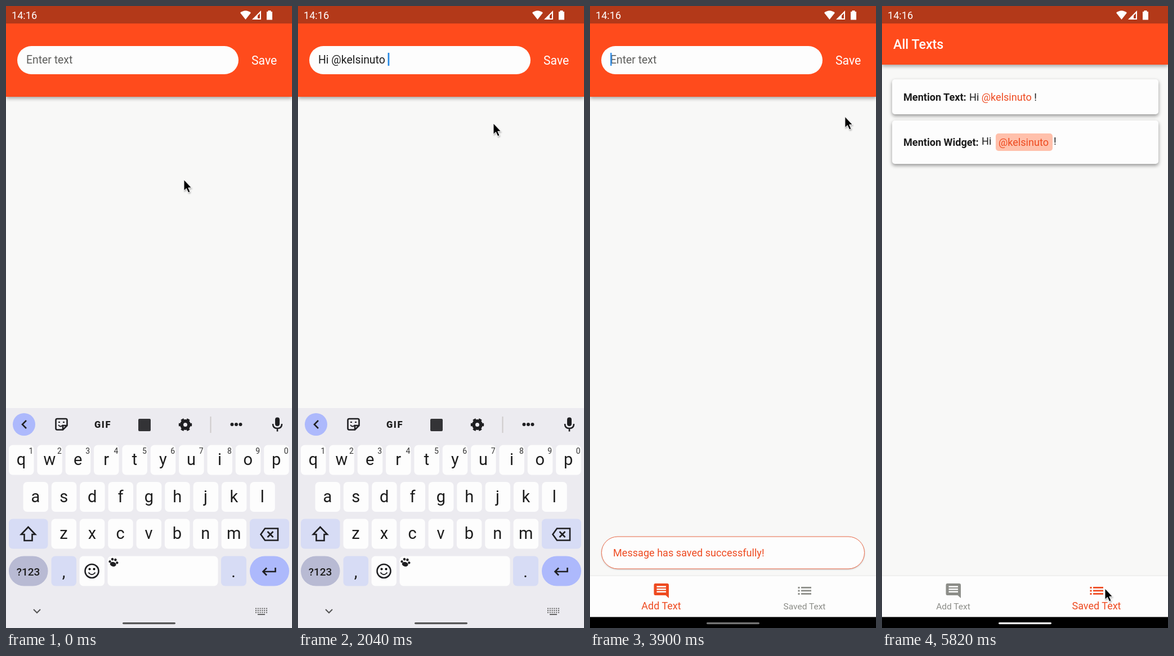
An HTML page for the animation above (5850 ms loop, 508 px wide and 1103 px high).

```html
<!DOCTYPE html>
<html lang="en">
<head>
<meta charset="utf-8">
<title>Mention text</title>
<style>
html, body { margin: 0; width: 100%; height: 100%; overflow: hidden; background: #f8f8f7; }
svg { display: block; width: 508px; height: 1103px; }
text { font: 18.1px Roboto, sans-serif; white-space: pre; fill: #1c1c1c; }
.mid { text-anchor: middle; }
.white { fill: #fff; }
.red { fill: #ee4a20; }
.bold { font-weight: 700; }
.paper { fill: #fdfdfd; }
.bar { fill: #ff4b1c; filter: drop-shadow(0 3px 3px #0005); }
.card { fill: #fdfdfd; filter: drop-shadow(0 3px 3px #0006); }
.line { fill: none; stroke: #1f1f22; stroke-width: 2.6; }
.soft { fill: #d7dcf5; }
.blue { fill: #adb9fc; }
.key { font-size: 29px; }
.digit { font-size: 14px; fill: #333; }
</style>
</head>
<body>
<svg viewBox="0 0 508 1103">
  <g id="addPage">
    <rect class="bar" y="20" width="508" height="141"/>
    <rect class="paper" x="20" y="71" width="393" height="50" rx="25"/>
    <text id="field" x="36" y="101.5" style="font-size:19.4px"></text>
    <rect id="caret" y="83" width="2.7" height="23" fill="#2488e5"/>
    <text class="white" x="436" y="104" style="font-size:21.2px">Save</text>
  </g>

  <g id="listPage">
    <rect class="bar" y="20" width="508" height="84"/>
    <text class="white" x="20" y="76" style="font-size:23.2px;font-weight:500">All Texts</text>
    <rect class="card" x="18" y="130" width="473" height="62" rx="5"/>
    <text x="38" y="167.5" class="bold">Mention Text:</text>
    <text x="155" y="167.5">Hi <tspan class="red">@kelsinuto</tspan> !</text>
    <rect class="card" x="18" y="203" width="473" height="77" rx="5"/>
    <text x="38" y="247.5" class="bold">Mention Widget:</text>
    <text x="177" y="245.5">Hi</text>
    <rect x="202" y="226" width="101" height="31" rx="5" fill="#ffc0ab"/>
    <text x="207" y="247.5" class="red">@kelsinuto</text>
    <text x="305" y="245.5">!</text>
  </g>

  <rect width="508" height="31" fill="#b33919"/>
  <text class="white" x="10" y="22.5">14:16</text>
  <g class="white">
    <path d="M416 12Q425.500 4.500 435 12L425.500 24Z"/>
    <path fill-rule="evenodd" d="M437 24 453 8V24ZM447 22H451V13L447 17Z"/>
    <path d="M463 10H465.500V8H470.500V10H473V24.500H463Z"/>
  </g>

  <g id="toast">
    <rect x="20.500" y="941" width="467" height="57" rx="28.500" fill="#fdfdfd" stroke="#ec6a48" style="filter:drop-shadow(0 1px 1px #0003)"/>
    <text class="red" x="41" y="976">Message has saved successfully!</text>
  </g>

  <rect class="paper" y="1011" width="508" height="73" style="filter:drop-shadow(0 -1px 1px #0001)"/>
  <g id="addTab">
    <path fill-rule="evenodd" d="M116 1024H137Q140 1024 140 1027V1050L134.500 1045H116Q113.500 1045 113.500 1042V1027Q113.500 1024 116 1024ZM118.500 1028.500V1031H135V1028.500ZM118.500 1033V1035.500H135V1033ZM118.500 1037.500V1040H135V1037.500Z"/>
    <text class="mid" x="126.500" y="1069.500" style="fill:inherit;font-size:inherit">Add Text</text>
  </g>
  <g id="savedTab">
    <path d="M369.500 1030h3v3h-3zm0 5.500h3v3h-3zm0 5.500h3v3h-3zM375 1030h18v2.700h-18zm0 5.500h18v2.700h-18zm0 5.500h18v2.700h-18z"/>
    <text class="mid" x="381" y="1069.500" style="fill:inherit;font-size:inherit">Saved Text</text>
  </g>
  <rect y="1083.500" width="508" height="20"/>

  <g id="board">
    <rect y="713" width="508" height="390" fill="#ecebf0"/>
    <circle class="blue" cx="32" cy="742" r="20"/>
    <path class="line" d="M36 735 29 742 36 749"/>
    <path class="line" d="M91 732H106Q108.500 732 108.500 734.500V744L101 751.500H91Q88.500 751.500 88.500 749V734.500Q88.500 732 91 732ZM108 744H101V751"/>
    <path class="line" style="stroke-width:2" d="M93 738H96M101 738H104M93 743Q97 748 101 743"/>
    <text class="mid" x="172" y="747.500" style="font-size:16.500px;font-weight:900;letter-spacing:1.600px">GIF</text>
    <rect x="235" y="732" width="22" height="22" rx="2" fill="#333336"/>
    <circle class="line" cx="318.500" cy="742.500" r="6.500" style="stroke-width:6"/>
    <circle class="line" cx="318.500" cy="742.500" r="10" pathLength="12" style="stroke-width:3.500" stroke-dasharray="1" stroke-dashoffset=".5"/>
    <path d="M363.500 728V757" stroke="#cfcbcb" stroke-width="2"/>
    <g fill="#1f1f22"><circle cx="401.500" cy="742" r="3"/><circle cx="409" cy="742" r="3"/><circle cx="416.500" cy="742" r="3"/>
      <rect x="478" y="729.500" width="8" height="15.500" rx="4"/></g>
    <path class="line" d="M474 741Q474 749 482 749T490 741M482 749V754.500"/>
    <g id="keys"></g>
    <path id="shift" class="line" d="M39.500 924 52 937H46.500V948H32.500V937H27Z"/>
    <path class="line" d="M460 926.500H483V947.500H460L452.500 937ZM464.500 932 474.500 942M474.500 932 464.500 942"/>
    <text class="mid" x="39.500" y="1009.500" style="font-size:19px;font-weight:500">?123</text>
    <circle class="line" cx="152.500" cy="1002" r="12"/>
    <circle cx="148.500" cy="998.500" r="2"/><circle cx="156.500" cy="998.500" r="2"/>
    <path class="line" style="stroke-width:2" d="M146.500 1004.500Q152.500 1012 158.500 1004.500"/>
    <g transform="rotate(12 191 986)" fill="#1f1f22">
      <ellipse cx="191" cy="990" rx="5.500" ry="4"/><circle cx="184.500" cy="986.500" r="2.200"/>
      <circle cx="188" cy="981.500" r="2.300"/><circle cx="193.500" cy="981.500" r="2.300"/><circle cx="197.500" cy="986" r="2.200"/>
    </g>
    <path class="line" d="M478.500 996V1003H457M463 996.500 456.500 1003 463 1009.500"/>
    <path class="line" style="stroke:#555;stroke-width:2" d="M49 1070 55 1076 61 1070"/>
    <path d="M443 1068.500H464M443 1072H464M443 1075.500H464" stroke="#666" stroke-width="2" stroke-dasharray="2 1.800"/>
    <path d="M447 1079H460" stroke="#666" stroke-width="2"/>
  </g>
  <rect id="handle" x="207" y="1093" width="94" height="3.200" rx="1.600"/>
  <path id="mouse" d="M0 0V19.500L4.400 15.500 7.800 23 11 21.500 7.800 14.300H13.500Z" stroke="#fff" stroke-width="1" style="filter:drop-shadow(1px 2px 1px #0004)"/>
</svg>
<script>
const LOOP = 5850, MENTION = 'Hi @kelsinuto ';
const $ = id => document.getElementById(id);
const make = (tag, attrs, text = '') => {
  const el = document.createElementNS('http://www.w3.org/2000/svg', tag);
  for (const k in attrs) el.setAttribute(k, attrs[k]);
  el.textContent = text;
  return $('keys').appendChild(el);
};
const cap = (x, y, w, cls = 'paper', rx = 7) =>
  make('rect', { x, y, width: w, height: 53, rx, class: cls });

const letters = [];
[['qwertyuiop', 5, 778.5], ['asdfghjkl', 30.5, 844], ['zxcvbnm', 80.5, 909.5]].forEach(([row, x0, y], r) =>
  [...row].forEach((ch, i) => {
    const x = x0 + i * 50.35;
    cap(x, y, 44.5);
    letters.push({ ch, y, el: make('text', { x: x + 22, class: 'key mid' }) });
    if (!r) make('text', { x: x + 39.5, y: 793.5, class: 'digit mid' }, (i + 1) % 10);
  }));
cap(5, 909.5, 69.5, 'soft');
cap(433, 909.5, 70, 'soft');
cap(5, 975.5, 69.5, '', 26.5).style.fill = '#b8bad3';
cap(80.5, 975.5, 44.5, 'soft');
cap(130.5, 975.5, 44.5);
cap(180.5, 975.5, 196);
cap(382, 975.5, 45, 'soft');
cap(433, 975.5, 70, 'blue', 26.5);
make('text', { x: 102.5, y: 1013, class: 'key mid' }, ',');
make('text', { x: 404, y: 1013, class: 'key mid' }, '.');

const typed = [[0, ''], [420, 'H'], [570, 'Hi'], [960, 'Hi '], [1080, 'Hi @'],
  [1920, MENTION], [2640, MENTION + '!'], [3540, '']];
const shifts = [[300, 510], [870, 1200], [2460, 2700]];
// start, end, x, y, sideways bend
const moves = [[1350, 1800, 347, 208, 0], [2760, 3150, 447, 97, 0], [3800, 4300, 396, 1033, 119]];

const ramp = (t, a, b) => Math.min(1, Math.max(0, (t - a) / (b - a)));
const ease = p => p * p * (3 - 2 * p);
const mix = (a, b, p) => a + (b - a) * p;
const show = (id, on) => $(id).style.display = on ? '' : 'none';

function tab(id, p) {
  const rgb = [[140, 238], [141, 74], [136, 32]].map(([a, b]) => mix(a, b, p));
  $(id).style.cssText = `fill:rgb(${rgb});font-size:${mix(15.5, 18, p)}px`;
}

let caps;
function setCaps(on) {
  if (on === caps) return;
  caps = on;
  for (const { ch, y, el } of letters) {
    el.textContent = on ? ch.toUpperCase() : ch;
    el.setAttribute('y', y + (on ? 38 : 35.5));
  }
  $('shift').style.fill = on ? '#1f1f22' : 'none';
}

function draw(t) {
  const text = typed.findLast(s => s[0] <= t)[1], field = $('field');
  field.textContent = text || 'Enter text';
  field.style.fill = text ? '#1c1c1c' : '#5e5e5c';
  $('caret').setAttribute('x', 36 + (text ? field.getComputedTextLength() : 0));
  const phase = t % 720;
  $('caret').style.opacity = Math.min(ramp(phase, 250, 310), 1 - ramp(phase, 660, 720));
  setCaps(shifts.some(([a, b]) => t >= a && t < b));

  const listed = t >= 4440;
  show('addPage', !listed);
  show('listPage', listed);
  const hide = ease(ramp(t, 3640, 3780));
  $('board').setAttribute('transform', `translate(0 ${hide * 390})`);
  show('board', hide < 1);
  $('toast').style.opacity = ramp(t, 3720, 3840) * (1 - ramp(t, 5100, 5220));

  const pick = ease(ramp(t, 4480, 4680));
  tab('addTab', 1 - pick);
  tab('savedTab', pick);
  const grey = mix(mix(85, 118, hide), 245, ramp(t, 4320, 4440));
  $('handle').style.fill = `rgb(${grey},${grey},${grey})`;

  let x = 316, y = 308;
  for (const [a, b, x1, y1, bend] of moves) {
    const p = ease(ramp(t, a, b));
    x = mix(x, x1, p) + bend * p * (1 - p);
    y = mix(y, y1, p);
  }
  $('mouse').setAttribute('transform', `translate(${x} ${y})`);
}

const start = performance.now();
function tick() {
  draw((performance.now() - start) % LOOP);
  requestAnimationFrame(tick);
}
tick();
</script>
</body>
</html>
```
